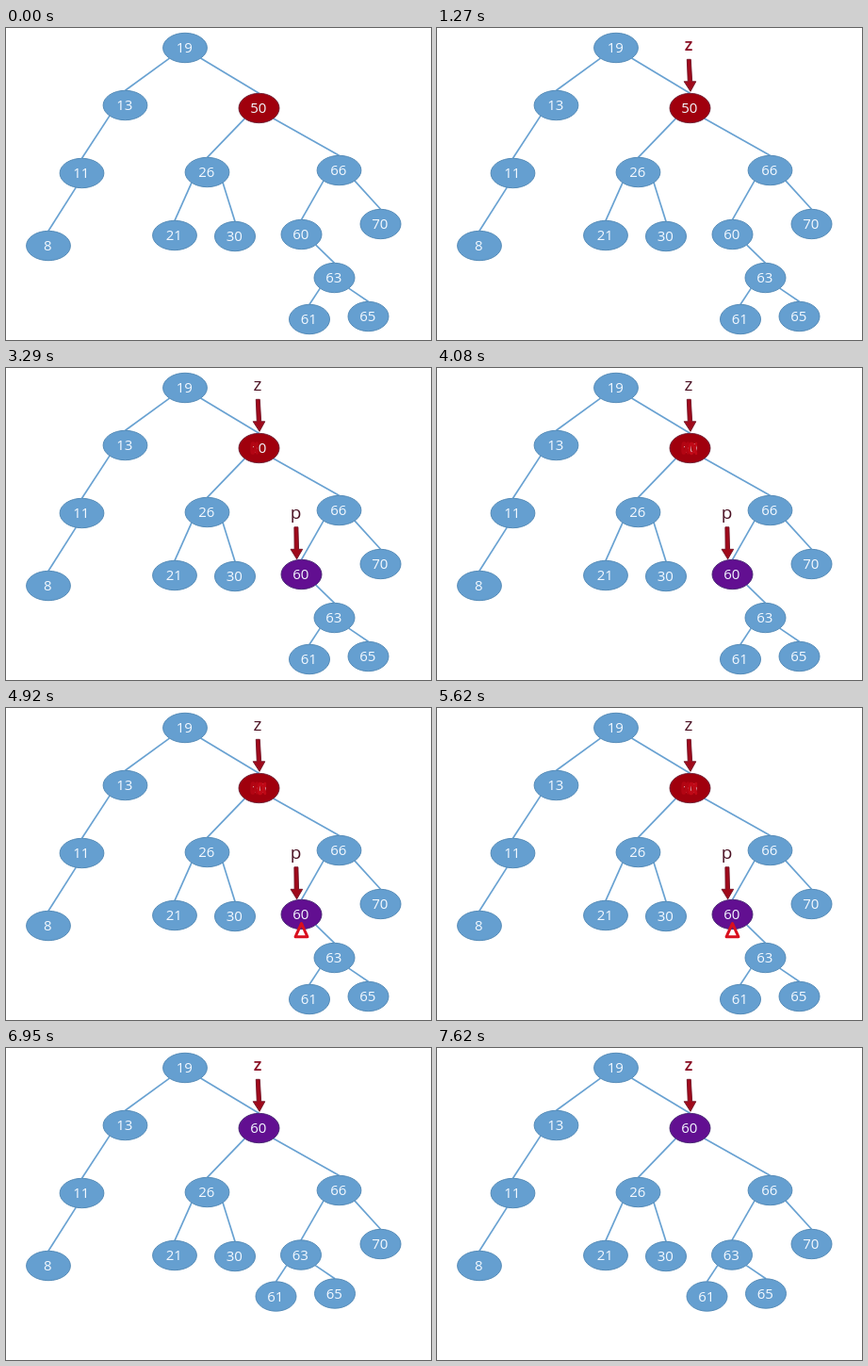
An HTML page with a canvas for the animation above (7670 ms loop, 451x331 px).

```html
<!DOCTYPE html>
<html lang="en">
<head>
<meta charset="utf-8">
<title>Deleting a node from a search tree</title>
<style>
  html, body { margin: 0; width: 100%; height: 100%; overflow: hidden; background: #fff; }
  canvas { display: block; }
</style>
</head>
<body>
<canvas id="stage" width="451" height="331"></canvas>
<script>
const ctx = document.getElementById('stage').getContext('2d');
const LOOP = 7670;
const SHOW_Z = 640, SHOW_P = 1740, DEEPEN = 2830, REPLACE = 5900;
const FONT = '"Open Sans", "Noto Sans", sans-serif';
const WIDE = 23.4, SLIM = 21.5, RY = 15.7;
const DIAGONAL = Math.PI / 4;

const BLUE = { fill: '#659fd0', rim: '#4e86b4' };
const RED = { fill: '#a0000d', rim: '#6b2035' };
const PURPLE = { fill: '#6c2e9e', rim: '#46387f' };
const DEEP = { fill: '#620f91', rim: '#43246f' };

// exit: angle from straight down at which branches leave the node
function node(key, x, y, rx, left, right, exit = DIAGONAL) {
  return { key, x, y, rx, left, right, exit };
}

const n63 = node(63, 348.5, 265, SLIM,
  node(61, 322, 309, SLIM), node(65, 384.5, 306, SLIM));
const target = node(50, 268.5, 85, SLIM,
  node(26, 213.5, 153, WIDE,
    node(21, 179, 220, WIDE), node(30, 243, 221, SLIM)),
  node(66, 353.5, 151, WIDE,
    node(60, 313.5, 219, SLIM, null, n63), node(70, 397.5, 208, SLIM)));
const before = node(19, 190, 21, WIDE,
  node(13, 126.5, 82, WIDE,
    node(11, 80.5, 154, WIDE, node(8, 45, 231, WIDE), null, 0.27)),
  target);

function moved(n, dx, dy) {
  return n && { ...n, x: n.x + dx, y: n.y + dy,
    left: moved(n.left, dx, dy), right: moved(n.right, dx, dy) };
}

// 60 takes the place of 50, and its subtree slides up into the gap
const raised = { ...target.right, left: moved(n63, -35.5, -45.5) };
const after = { ...before, right: { ...target, key: 60, right: raised } };

function edge(parent, child, side) {
  if (!child) return;
  ctx.beginPath();
  ctx.moveTo(parent.x + side * parent.rx * Math.sin(parent.exit),
    parent.y + RY * Math.cos(parent.exit));
  ctx.lineTo(child.x, child.y - RY);
  ctx.strokeStyle = '#69a2d2';
  ctx.lineWidth = 1.7;
  ctx.stroke();
}

function text(str, x, y, font, color) {
  ctx.font = font + ' ' + FONT;
  ctx.fillStyle = color;
  ctx.textAlign = 'center';
  ctx.fillText(str, x, y);
}

function drawTree(n, paint) {
  if (!n) return;
  edge(n, n.left, -1);
  edge(n, n.right, 1);
  drawTree(n.left, paint);
  drawTree(n.right, paint);
  const { fill, rim } = paint[n.key] || BLUE;
  ctx.beginPath();
  ctx.ellipse(n.x, n.y, n.rx, RY, 0, 0, Math.PI * 2);
  ctx.fillStyle = fill;
  ctx.fill();
  ctx.strokeStyle = rim;
  ctx.lineWidth = 0.9;
  ctx.stroke();
  text(n.key, n.x - 0.7, n.y + 5.3, '15px', '#f4f9ff');
}

function arrow(x, y, lean) {
  const half = [[2, 0], [2.2, 23.5], [6.3, 23.5], [0, 34]];
  ctx.save();
  ctx.transform(1, 0, lean, 1, x, y);
  ctx.beginPath();
  for (const [px, py] of half) ctx.lineTo(px, py);
  for (const [px, py] of half.reverse()) ctx.lineTo(-px, py);
  ctx.closePath();
  ctx.fillStyle = '#a0091a';
  ctx.fill();
  ctx.strokeStyle = '#6f1023';
  ctx.lineWidth = 0.9;
  ctx.stroke();
  ctx.restore();
}

// Draws the part of the curve at(0..1) that the pen has reached
function pen(t, start, end, color, width, at) {
  const reach = Math.min(1, (t - start) / (end - start));
  if (reach <= 0) return;
  ctx.save();
  ctx.beginPath();
  for (let i = 0; i <= 60; i++) ctx.lineTo(...at(reach * i / 60));
  ctx.strokeStyle = color;
  ctx.lineWidth = width;
  ctx.lineCap = ctx.lineJoin = 'round';
  ctx.stroke();
  ctx.restore();
}

function scribble(x, y, rx, ry) {
  return u => [x + rx * Math.cos(u * 13), y - ry * Math.cos(u * 20)];
}

function triangle(x, y, r) {
  return u => {
    const i = Math.floor(u * 3), k = u * 3 - i;
    const corner = j => [x + r * 0.78 * Math.sin(j * Math.PI * 2 / 3),
      y - r * Math.cos(j * Math.PI * 2 / 3)];
    const [ax, ay] = corner(i), [bx, by] = corner(i + 1);
    return [ax + (bx - ax) * k, ay + (by - ay) * k];
  };
}

function draw(t) {
  const done = t >= REPLACE;
  const paint = { 50: RED };
  if (t >= SHOW_P) paint[60] = t < DEEPEN ? PURPLE : DEEP;

  ctx.fillStyle = '#fff';
  ctx.fillRect(0, 0, 451, 331);
  drawTree(done ? after : before, paint);

  if (t >= SHOW_Z) {
    const plain = t >= SHOW_P && !done;
    if (plain) text('z', 267, 24, '19px', '#4c1224');
    else text('Z', 267, 24, 'bold 14px', '#8c1428');
    arrow(267.3, 33.3, 0.05);
  }
  if (t >= SHOW_P && !done) {
    text('p', 307.5, 160, '19px', '#4c1224');
    arrow(307.9, 168.8, 0.02);
  }
  if (!done) {
    pen(t, 3060, 3280, '#b30513', 2.5, scribble(263.5, 85, 3, 5.5));
    pen(t, 3650, 4250, '#c00816', 2.5, scribble(271.5, 85.5, 3.5, 5.5));
    pen(t, 4420, 4850, '#d9101e', 3, triangle(313.5, 238, 9.5));
  }
}

const began = performance.now();
function tick() {
  draw((performance.now() - began) % LOOP);
  requestAnimationFrame(tick);
}
tick();
</script>
</body>
</html>
```
